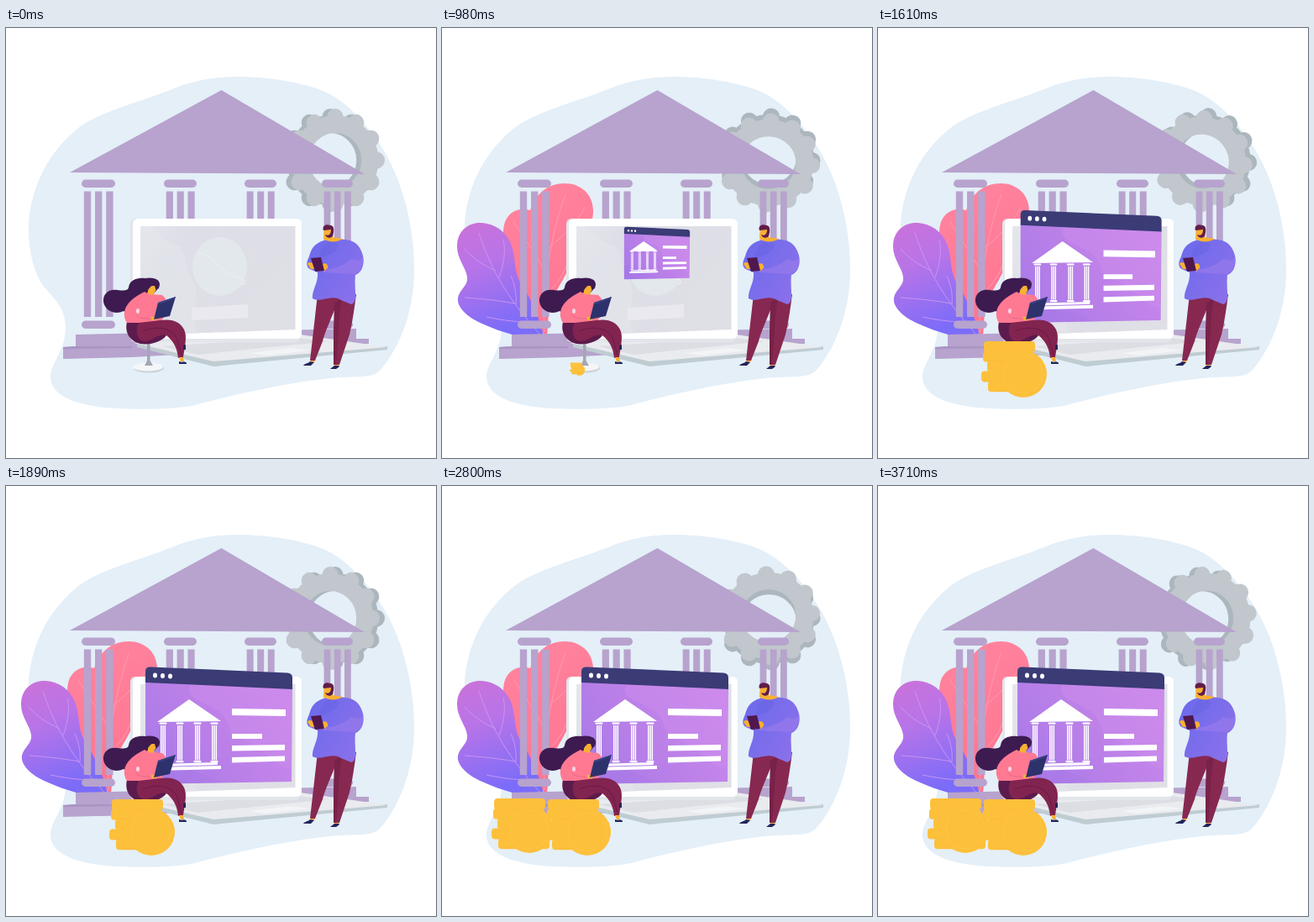
An HTML page that plays this animation: 512 by 512 pixels, repeating every 3.78 s.

```html
<!DOCTYPE html>
<html lang="en">
<head>
<meta charset="utf-8">
<title>Online banking</title>
<style>
  html, body { margin: 0; height: 100%; overflow: hidden; background: #fff; }
  svg { display: block; width: 100vw; height: 100vh; }
</style>
</head>
<body>
<svg viewBox="0 0 512 512">
  <defs>
    <linearGradient id="leafFill" x2=".3" y2="1">
      <stop stop-color="#cb72d8"/><stop offset=".4" stop-color="#b874e8"/><stop offset="1" stop-color="#7b6cf9"/>
    </linearGradient>
    <linearGradient id="pinkFill" x2=".3" y2="1">
      <stop stop-color="#ff85a0"/><stop offset="1" stop-color="#ff7590"/>
    </linearGradient>
    <linearGradient id="pageFill" x1="0" y1=".8" x2="1" y2=".3">
      <stop stop-color="#a87ae8"/><stop offset=".5" stop-color="#bb80e8"/><stop offset="1" stop-color="#ca89ec"/>
    </linearGradient>
    <linearGradient id="screenFill" x2="1" y2=".6">
      <stop stop-color="#e4e7ed"/><stop offset=".25" stop-color="#dddee7"/><stop offset="1" stop-color="#dfdfe6"/>
    </linearGradient>
    <linearGradient id="sweaterFill" x2="1" y2=".7">
      <stop stop-color="#6a6aec"/><stop offset="1" stop-color="#8a70ea"/>
    </linearGradient>
    <g id="wheel"></g>
  </defs>

  <path fill="#e4eff8" d="M27 232C30 190 50 148 85 120C110 100 160 88 200 72C225 62 250 58 276 58C310 58 350 64 378 75C405 87 428 112 446 140C472 180 486 235 486 288C486 335 470 380 445 408C435 418 415 414 385 417C330 423 270 437 225 449C195 455 140 455 110 451C75 446 53 435 53 415C53 400 70 385 71 358C71 335 60 325 45 308C32 290 26 262 27 232Z"/>

  <g id="gear">
    <g transform="translate(-3 0) scale(.96 1)" color="#acb6bd"><use href="#wheel"/></g>
    <g transform="translate(3 0) scale(.96 1)" color="#c1c7cc"><use href="#wheel"/></g>
  </g>

  <g id="leaves">
    <path fill="url(#pinkFill)" d="M122 366C110 340 92 315 84 285C75 268 70 245 75 231C80 218 92 213 105 217C112 196 127 185 146 185C166 185 181 199 180 220C179 242 162 250 155 274C148 300 129 318 127 338C126 350 126 358 125 366Z"/>
    <path fill="none" stroke="#ff9eb0" stroke-width=".9" d="M122 362C120 310 128 250 147 198M123 290C110 268 95 245 85 230M126 262C145 248 160 232 170 214M121 320C138 305 147 290 151 274"/>
    <path fill="url(#leafFill)" d="M122 370C95 370 70 362 50 353C30 345 17 332 19 321C21 311 31 307 30 297C29 285 17 275 18 258C19 241 32 231 47 232C66 233 80 246 84 263C88 279 86 292 95 306C107 324 116 345 122 370Z"/>
    <path fill="none" stroke="#cf98f2" stroke-width=".9" d="M118 366C90 335 62 300 44 244M64 289C50 283 36 274 27 263M68 297C74 280 76 265 73 252M87 328C65 324 42 322 27 321M88 329C89 317 87 306 82 295M103 350C85 350 67 347 53 344"/>
  </g>

  <g id="bank" fill="#b7a3cd">
    <path d="M256.500 74L76 172L427 174Z"/>
    <path d="M83 365L417 358V370H432V376L150 392L68 394V380L83 379Z"/>
    <path fill="#a994c3" d="M83 379H150V381L68 382V380Z"/>
  </g>

  <g id="laptop">
    <path fill="#bfccd2" d="M156 376L247 396L454 379V383L247 403L156 380Z"/>
    <path fill="#e9ebef" d="M152 375L350 365L454 380L247 397Z"/>
    <path fill="#dcdee4" d="M186 379L345 369L385 373L228 389Z"/>
    <path fill="#f3f4f6" d="M290 387L340 381L362 384L310 390Z"/>
    <rect x="148" y="227" width="202" height="147" rx="6" fill="#e2e5ea"/>
    <rect x="151" y="227" width="201" height="143" rx="6" fill="#fff"/>
    <path fill="url(#screenFill)" d="M160 236H344.500V359L160 366Z"/>
    <path fill="#e5e8ed" d="M160 236C185 240 181 253 202 258C217 263 211 285 222 300C234 317 218 337 228 363L160 366Z" opacity=".55"/>
    <ellipse cx="254.500" cy="284" rx="32.500" ry="35" fill="#e3e8ec"/>
    <path fill="none" stroke="#e9edf0" stroke-width="1.500" d="M229 268C250 271 253 290 273 296S280 306 280 306"/>
    <path fill="#e9e9ef" d="M221 333L288 329V345L221 348Z"/>
  </g>

  <g id="page">
    <path fill="url(#pageFill)" d="M166 232L341 240L340 352L166 355Z"/>
    <path fill="#cd8cec" opacity=".45" d="M166 234L220 237C210 252 235 257 252 267C270 279 259 295 284 303C308 311 313 332 340 337V241Z"/>
    <path fill="#9a72e2" opacity=".2" d="M166 320C186 308 184 337 215 339C243 342 244 351 260 353L166 355Z"/>
    <path fill="#3b3b76" d="M166 234V221Q166 215 172 215.500L335 222.500Q341 223 341 228V242Z"/>
    <g fill="#fff">
      <ellipse cx="177.500" cy="225.500" rx="2.500" ry="3"/>
      <ellipse cx="186.500" cy="226" rx="2.500" ry="3"/>
      <ellipse cx="195.500" cy="226.500" rx="2.500" ry="3"/>
      <path d="M218 254L256 280L180 281ZM184 331L252 329V332L184 334ZM180 335L256 333V337L180 339Z"/>
      <path d="M269 265L333 266V274L269 273ZM269 295H305V301H269ZM269 309L332 308V314.500L269 315.500ZM269 323L332 321.500V327.500L269 329.500Z"/>
      <g id="pillars"></g>
    </g>
  </g>

  <g id="woman">
    <ellipse cx="170" cy="405" rx="18" ry="5.500" fill="#ccd3d8"/>
    <ellipse cx="169" cy="403.500" rx="18" ry="5" fill="#f4f6f8"/>
    <path fill="#a5a7b4" d="M168 374H171.500V396L175 402H165L168 396Z"/>
    <path fill="#5b1b4c" d="M144 350C141 362 147 373 160 376C172 378 186 373 191 366L180 351Z"/>
    <path fill="#3d1b50" d="M183 305C183 299 175 296 165 298C156 297 147 300 146 309C145 313 140 313 133 312C122 310 115 317 116 326C118 337 130 342 140 337C146 341 150 343 155 340L170 325C173 316 183 312 183 305Z"/>
    <path fill="#f8b032" d="M168 307H177L178.500 312L176 316L180 320L165 321L169 314Z"/>
    <path fill="#3d1b50" d="M165 299C177 296 184 301 182 311C178 303 173 305 168 314L161 316Z"/>
    <path fill="#ff7992" d="M165 314C173 320 179 316 186 318C193 323 193 334 190 342L183 351H144C140 345 140 338 143 332C149 322 156 319 165 314Z"/>
    <path fill="none" stroke="#ea6a88" d="M154 342C163 349 173 344 178 347"/>
    <ellipse cx="157" cy="337" rx="2" ry="3" fill="#f5d5e6"/>
    <path fill="#822450" d="M158 351L184 348C199 346 207 350 212 359C216 367 213 378 211 392L205 393C204 382 200 373 191 366C180 363 176 373 164 373C155 371 154 358 158 351Z"/>
    <path fill="none" stroke="#681b45" d="M163 361C181 354 201 356 205 375L209 390"/>
    <path fill="#f8b032" d="M206 392H211L212 397H208ZM172 345C176 342 180 345 179 348H174Z"/>
    <path fill="#23245c" d="M206 397C210 399 213 396 215 399V400H206ZM211 378L214 377V383H211Z"/>
    <path fill="#2d326c" d="M181 327L202 320L195 343L176 347Z"/>
    <path fill="#3a4285" d="M181 327L202 320L201 322L182 329Z"/>
  </g>

  <g id="man">
    <path fill="#872850" d="M371 317H417C415 332 413 348 409 365L397 401H390L390 361L391 336C386 349 380 361 377 373L368 396H362L366 361Z"/>
    <path fill="#6b1d44" d="M391 327L390 361V401H393L396 360C396 342 399 330 400 321Z" opacity=".55"/>
    <path fill="#f8b032" d="M363 396H368L366 399H362ZM391 401H396L395 404H391Z"/>
    <path fill="#23245c" d="M362 397L367 398L363 402H354C356 399 359 400 362 397ZM391 402H397L396 404L393 406H386Z"/>
    <path fill="url(#sweaterFill)" d="M379 253C367 256 363 264 361 272C357 280 357 286 364 288L371 291C372 304 364 312 365 322C374 328 387 316 399 324L411 329C420 326 414 311 416 294C425 291 427 279 425 271C422 260 416 253 404 252L389 250Z"/>
    <path fill="#987aed" opacity=".7" d="M378 288C393 287 404 281 412 275C418 279 424 276 425 274C426 285 421 290 415 293C402 292 391 292 378 291Z"/>
    <path fill="#5f60dc" opacity=".35" d="M388 252C404 258 391 269 379 272L371 277L377 259Z"/>
    <path fill="#f8b032" d="M379 239H389V249L401 251C394 256 383 255 378 251ZM359 281C361 277 365 280 368 282V287H363ZM377 281C381 279 384 282 383 286L378 290Z"/>
    <path fill="#611d49" d="M378 241C376 236 381 233 386 235C391 235 391 241 389 248C386 251 381 250 380 246C384 248 387 246 387 240Z"/>
    <path fill="#50184e" d="M363 274L375 273L379 289L368 290Z"/>
  </g>

  <g id="smallPile"></g>
  <g id="bigPile"></g>
</svg>

<script>
const LOOP = 3780, STEP = 70;
const find = id => document.getElementById(id);

function bankColumn(x, w, bottom) {
  const cap = y => `<rect x="${x}" y="${y}" width="${w}" height="9.500" rx="4.700"/>`;
  const shafts = [.07, .4, .73].map(k =>
    `<rect x="${x + w * k}" y="194.500" width="${w * .21}" height="${bottom - 194.5}"/>`).join('');
  return cap(180.500) + shafts + cap(348.500);
}

function pagePillar(x) {
  const shafts = [0, 2.3, 4.6].map(d =>
    `<rect x="${x + d}" y="285" width="1.500" height="41.500"/>`).join('');
  return `<rect x="${x - 1.5}" y="281.500" width="9" height="2.300" rx="1"/>${shafts}
    <rect x="${x - 1.5}" y="327" width="9" height="2.300" rx="1"/>`;
}

function coinPile(left, top, coinX, coinY, r) {
  let shape = '';
  [4, 3, 8, 1, 9].forEach((shift, i) => {
    const y = top + i * 11.8;
    shape += `<rect x="${left + shift}" y="${y}" width="61" height="13" rx="4" fill="#fdc03b"/>
      <path d="M${left + shift + 8} ${y + 12}H${left + 43}" stroke="#f8b435" stroke-width=".6"/>`;
  });
  return `${shape}
    <circle cx="${coinX}" cy="${coinY}" r="${r}" fill="#fdc03b"/>
    <circle cx="${coinX}" cy="${coinY}" r="${r - 5}" fill="none" stroke="#ffc64a" stroke-width=".8"/>`;
}

find('bank').innerHTML +=
  [[90, 40], [188, 39], [284, 38], [376, 37]].map(([x, w]) => bankColumn(x, w, 344)).join('');
find('pillars').innerHTML = [184, 204, 225, 245].map(pagePillar).join('');
find('bigPile').innerHTML = coinPile(122, 373, 173, 412, 28);
find('smallPile').innerHTML = coinPile(58, 372, 104, 409, 28);

let wheel = '<circle r="43" fill="none" stroke="currentColor" stroke-width="21"/>';
for (let a = 0; a < 360; a += 30)
  wheel += `<circle cy="-51.500" r="10" fill="currentColor" transform="rotate(${a})"/>`;
find('wheel').innerHTML = wheel;

// Each part grows from its pivot: id, pivot x, pivot y, start ms, end ms
const growing = [
  ['leaves', 99, 283, 105, 725],
  ['page', 258, 254, 430, 1660],
  ['bigPile', 161, 406, 840, 1450],
  ['smallPile', 105, 406, 1940, 2570]
];

function draw(now) {
  const t = Math.floor(now % LOOP / STEP) * STEP;
  find('gear').setAttribute('transform', `translate(389 157.500) rotate(${t / LOOP * 360})`);
  for (const [id, x, y, start, end] of growing) {
    const s = Math.min(1, Math.max(0, (t - start) / (end - start)));
    const part = find(id);
    part.style.display = s ? '' : 'none';
    part.setAttribute('transform', `translate(${x} ${y}) scale(${s}) translate(${-x} ${-y})`);
  }
  requestAnimationFrame(() => draw(performance.now() - origin));
}
const origin = performance.now();
draw(0);
</script>
</body>
</html>
```
